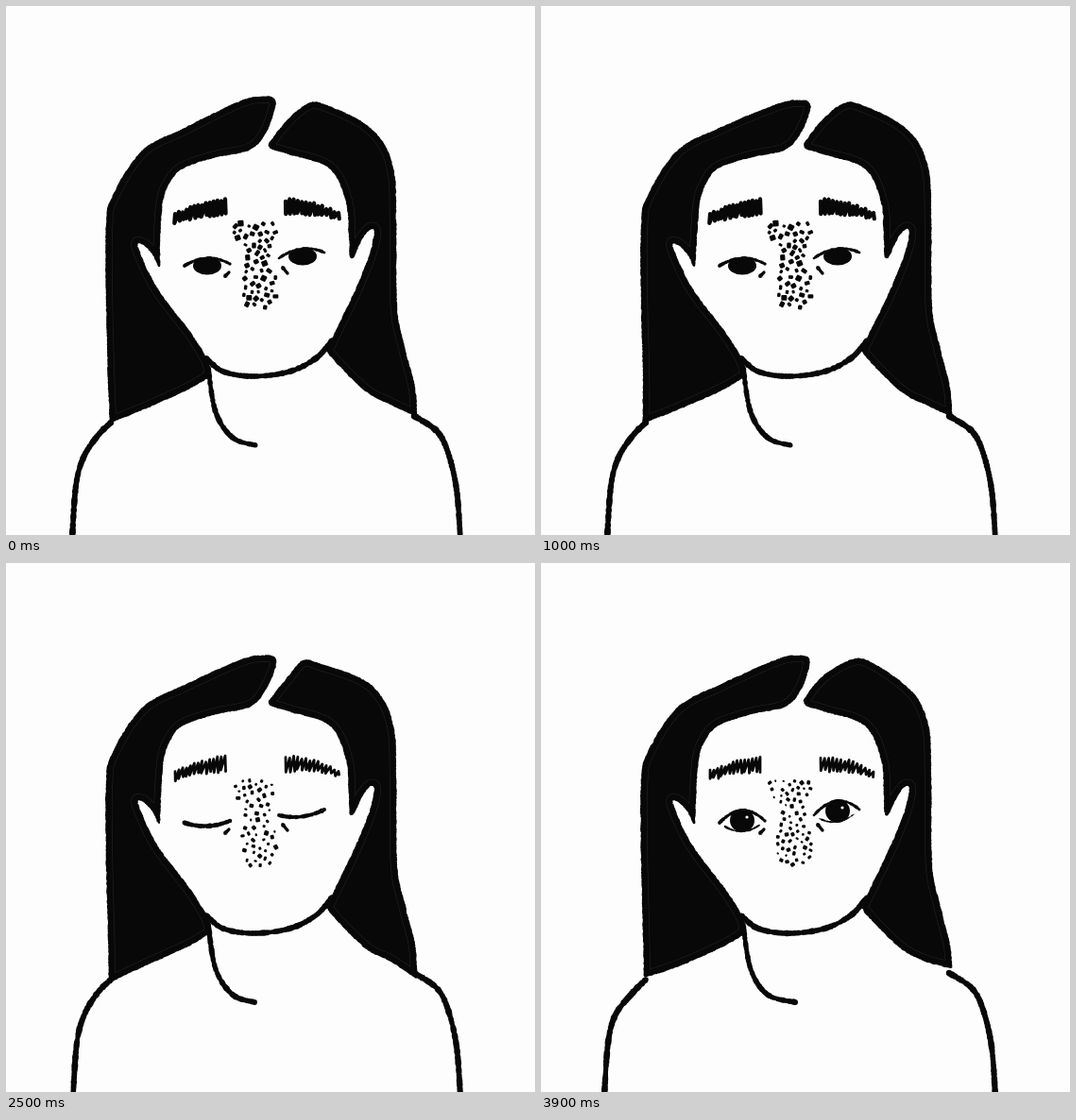
These frames come from a looping animation (560 by 560 pixels, 4000 ms). An HTML page with a canvas:

```html
<!DOCTYPE html>
<html lang="en">
<head>
<meta charset="utf-8">
<title>Portrait</title>
<style>
html, body { margin: 0; width: 100%; height: 100%; overflow: hidden; background: #fdfdfd; }
canvas { display: block; }
</style>
</head>
<body>
<canvas id="stage" width="560" height="560"></canvas>
<script>
const ctx = document.getElementById('stage').getContext('2d');
const INK = '#080808', PAPER = '#fdfdfd';
const STEP = 100, STEPS = 40;

function seeded(seed) {
  let s = seed * 7919 + 17;
  return () => {
    s = (s + 0x6d2b79f5) | 0;
    let t = Math.imul(s ^ (s >>> 15), 1 | s);
    t = (t + Math.imul(t ^ (t >>> 7), 61 | t)) ^ t;
    return ((t ^ (t >>> 14)) >>> 0) / 4294967296;
  };
}

function pairs(text) {
  const n = text.trim().split(/\s+/).map(Number);
  return Array.from({ length: n.length / 2 }, (_, i) => [n[2 * i], n[2 * i + 1]]);
}

// Catmull-Rom spline sampled about once per pixel; a repeated point makes a corner.
function spline(points, closed) {
  const n = points.length, out = [];
  const at = i => closed ? points[(i + n) % n] : points[Math.max(0, Math.min(n - 1, i))];
  for (let i = 0; i < (closed ? n : n - 1); i++) {
    const a = at(i - 1), b = at(i), c = at(i + 1), d = at(i + 2);
    const count = Math.ceil(Math.hypot(c[0] - b[0], c[1] - b[1]));
    for (let k = 0; k < count; k++) {
      const t = k / count;
      out.push([0, 1].map(j => b[j] + 0.5 * t * (c[j] - a[j] +
        t * (2 * a[j] - 5 * b[j] + 4 * c[j] - d[j] + t * (3 * (b[j] - c[j]) + d[j] - a[j])))));
    }
  }
  if (!closed) out.push(points[n - 1]);
  return out;
}

const quad = (a, b, c, t) => (1 - t) * (1 - t) * a + 2 * t * (1 - t) * b + t * t * c;

// Slightly uneven pen line.
function trace(samples, width, seed = 1) {
  const random = seeded(seed);
  let wobble = 0;
  ctx.fillStyle = INK;
  ctx.beginPath();
  for (const [x, y] of samples) {
    wobble = wobble * 0.6 + (random() - 0.5) * 0.6;
    const r = Math.max(0.5, width / 2 + wobble);
    ctx.moveTo(x + r, y);
    ctx.arc(x, y, r, 0, 7);
  }
  ctx.fill();
}

const brush = (text, width, seed) => trace(spline(pairs(text)), width, seed);

function lock(text, seed) {
  const samples = spline(pairs(text), true);
  const shape = new Path2D();
  samples.forEach(([x, y]) => shape.lineTo(x, y));
  shape.closePath();
  ctx.fillStyle = INK;
  ctx.fill(shape);
  // faint seam between the outline and the filled area
  ctx.save();
  ctx.clip(shape);
  ctx.lineJoin = 'round';
  for (const [color, width] of [['#262626', 12], [INK, 11]]) {
    ctx.strokeStyle = color;
    ctx.lineWidth = width;
    ctx.stroke(shape);
  }
  ctx.restore();
  trace(samples, 2.6, seed);
}

// The hair is redrawn in a cycle of four; the swing moves the parting and the hems.
function drawHair(phase) {
  const s = Math.sin(phase * Math.PI / 2), c = Math.cos(phase * Math.PI / 2);
  const tipX = 284 + s, tipY = 103 - 2 * c, peak = 321 - 6 * s;
  const inner = 163 - c, hem = 440 + 2.5 * s;
  const cornerL = `${110 + c} ${hem}`, cornerR = `434 ${hem - 7 + 3 * s}`;
  lock(`${cornerL} ${cornerL} 109 390 107 310 107 235 113 203 145 154 192 129
    245 ${tipY + 2} 268 ${tipY - 4} ${tipX} ${tipY} 275 132 258 151 222 159
    187 171 ${inner + 10} 187 ${inner + 3} 207 ${inner} 245 162 275 162 275 155 261
    144 251 139 256 159 299 197 350 215 384 203 399 150 424`, phase + 2);
  lock(`280 149 ${285 + s} 138 301 119 ${peak} 104 ${peak + 18} ${106 + 2 * s} 377 124
    399 146 410 178 412 225 413 320 422 365 432 405 ${cornerR} ${cornerR}
    408 421 380 406 342 367 344 357 368 307 385 266 391 240 386 235 377 245
    366 266 364 245 361 207 343 171 300 156`, phase + 8);
}

// lift: upper lid above (or below) the eye line; sway: shoulder and neck shift.
const POSES = {
  A: { seed: 3, lift: 7, sway: 0, neck: 264, dot: 5.2, brow: 4.2 },
  B: { seed: 5, lift: 5.5, sway: -5, neck: 262, dot: 4.2, brow: 3 },
  C: { seed: 9, lift: -5, sway: -1, neck: 267, dot: 4.6, brow: 4 },
  D: { seed: 12, lift: -4.5, sway: 1, neck: 263, dot: 4.2, brow: 2.8 },
  E: { seed: 15, lift: 12, sway: -3, neck: 269, dot: 3.8, brow: 2.8 }
};

function drawBody({ seed, sway, neck }) {
  const l = 70 + sway, r = 481;
  brush(`111 441 97 455 ${l + 12} 478 ${l + 4} 508 ${l} 564`, 6, seed);
  brush(`432 434 456 450 ${r - 13} 473 ${r - 4} 512 ${r} 564`, 6, seed + 1);
  brush('212 373 230 387 262 392 300 387 328 373 345 354', 5.6, seed);
  brush(`214 383 222 430 240 457 ${neck} 465`, 5.4, seed + 2);
}

function drawBrow(from, to, top, bottom, { seed, brow }) {
  const random = seeded(seed + from), strokes = 13;
  ctx.strokeStyle = INK;
  ctx.lineWidth = brow;
  ctx.lineCap = ctx.lineJoin = 'round';
  ctx.beginPath();
  for (let i = 0; i <= strokes; i++) {
    const t = i / strokes, x = from + (to - from) * t;
    ctx.lineTo(x + 1, quad(...top, t) + random() * 3);
    ctx.lineTo(x + random() * 2, quad(...bottom, t) - random() * 3);
  }
  ctx.stroke();
}

function drawFreckles({ seed, dot }) {
  const random = seeded(seed), placed = [];
  for (let tries = 0; tries < 2600; tries++) {
    const y = 230 + random() * 90;
    const [mid, half] = y < 249 ? [263, 24 - Math.abs(y - 239) * 0.5]
      : y < 284 ? [266, 13] : [268, 18 - Math.max(0, y - 309) * 0.7];
    const x = mid + (random() * 2 - 1) * half;
    if (placed.some(p => Math.hypot(p[0] - x, p[1] - y) < 6.2)) continue;
    placed.push([x, y]);
    const w = dot * (0.65 + random() * 0.6), h = w * (0.65 + random() * 0.35);
    ctx.save();
    ctx.translate(x, y);
    ctx.rotate(random() * Math.PI);
    ctx.fillStyle = INK;
    ctx.beginPath();
    ctx.roundRect(-w / 2, -h / 2, w, h, 1.2);
    ctx.fill();
    ctx.restore();
  }
}

function oval(x, y, rx, ry, color = INK) {
  ctx.fillStyle = color;
  ctx.beginPath();
  ctx.ellipse(x, y, rx, ry, 0, 0, 7);
  ctx.fill();
}

function drawEye([x0, y0], [x1, y1], irisX, lift, seed) {
  const arc = rise => Array.from({ length: 50 }, (_, i) =>
    [x0 + (x1 - x0) * i / 49, quad(y0, (y0 + y1) / 2 - 2 * rise, y1, i / 49)]);
  const lid = arc(lift), mid = (y0 + y1) / 2;
  if (lift > 10) {
    oval(irisX, mid - 1.5, 13, 12.5);
    oval(irisX + 5, mid - 5, 1.6, 1.6, PAPER);
    trace(arc(-10).slice(6, 44), 1.8, seed);
  } else if (lift > 0) {
    ctx.save();
    ctx.beginPath();
    lid.forEach(([x, y]) => ctx.lineTo(x, y));
    ctx.lineTo(x1, 300);
    ctx.lineTo(x0, 300);
    ctx.clip();
    oval(irisX, mid + 1, 15, 9.5);
    ctx.restore();
  }
  trace(lid, lift < 0 ? 4.4 : 3.2, seed);
}

function poseAt(i) {
  if (i < 17) return 'ABAAB'[i % 5];
  if (i < 37) return 'CDDC'[i % 4];
  return 'E';
}

function draw(i) {
  const pose = POSES[poseAt(i)];
  ctx.fillStyle = PAPER;
  ctx.fillRect(0, 0, 560, 560);
  drawHair(i % 4);
  drawBody(pose);
  drawBrow(178, 231, [219, 208, 203], [231, 222, 222], pose);
  drawBrow(295, 351, [204, 204, 219], [222, 219, 227], pose);
  drawFreckles(pose);
  drawEye([189, 275], [237, 273], 213, pose.lift, 4);
  drawEye([289, 267], [337, 261], 314, pose.lift, 5);
  brush('232 286 236 282', 4.4);
  brush('293 277 298 283', 4.4);
}

let shown = -1;
function tick() {
  const i = Math.floor(performance.now() / STEP) % STEPS;
  if (i !== shown) draw(shown = i);
  requestAnimationFrame(tick);
}
tick();
</script>
</body>
</html>
```
